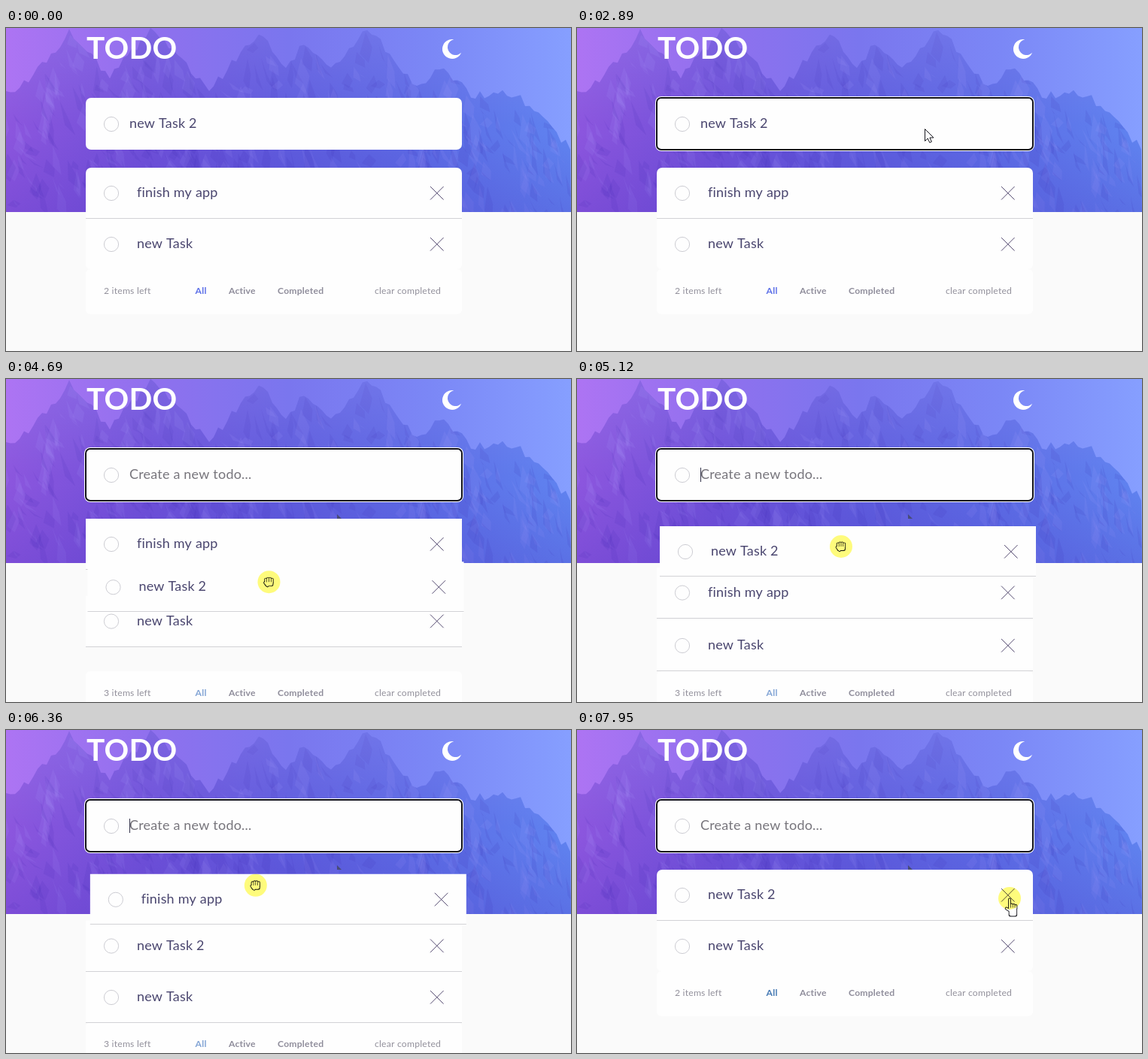
Animation, 751 px wide and 430 px high, one loop 8000 ms. Source, as an HTML page with a canvas:

```html
<!DOCTYPE html>
<html lang="en">
<head>
<meta charset="utf-8">
<title>Todo</title>
<style>
html, body { margin: 0; width: 100%; height: 100%; overflow: hidden; background: #fafafa; }
canvas { display: block; }
</style>
</head>
<body>
<canvas id="stage" width="751" height="430"></canvas>
<script>
const W = 751, H = 430, LOOP = 8000, HERO = 245;
const LEFT = 106, TOP = 186, ROW = 68, CARD = 500;
const FONT = 'Lato, sans-serif', INK = '#4a466f', CARD_BG = '#fefefe';
const A = 'finish my app', B = 'new Task', C = 'new Task 2';

// Moments of the story, in ms
const ENTER = 390, FOCUS = 1300, ADD = 3370, GRAB1 = 4200, DROP1 = 5520;
const GRAB2 = 5970, DROP2 = 6430, REMOVE = 7260, BLINK = 530;

const ctx = document.getElementById('stage').getContext('2d');
const clamp = v => Math.max(0, Math.min(1, v));
const smooth = v => v * v * (3 - 2 * v);
const easeOut = (t, start, span) => 1 - (1 - clamp((t - start) / span)) ** 3;

// ---- Hero backdrop -------------------------------------------------
function seeded(seed) {
  return () => (seed = (seed * 16807) % 2147483647) / 2147483647;
}

function gradient(g, x, y0, y1, colors) {
  const fill = g.createLinearGradient(0, y0, x, y1);
  colors.forEach((c, i) => fill.addColorStop(i / (colors.length - 1), c));
  return fill;
}

function poly(g, pts, fill) {
  g.beginPath();
  pts.forEach(([x, y]) => g.lineTo(x, y));
  g.closePath();
  g.fillStyle = fill;
  g.fill();
}

const peaks = [[85, 5], [195, 0], [335, 8], [400, 18], [480, 0], [580, 48], [660, 82]];

function ridgeAt(x) {
  return Math.min(90 + Math.max(0, x - 680), ...peaks.map(([px, py]) => py + Math.abs(x - px) * 1.15));
}

function makeHero() {
  const hero = document.createElement('canvas');
  hero.width = W;
  hero.height = HERO;
  const g = hero.getContext('2d'), rand = seeded(77);
  const paint = fill => { g.fillStyle = fill; g.fillRect(0, 0, W, HERO); };
  paint(gradient(g, W, 0, 0, ['#ad74f3', '#9070ee', '#7a76ee', '#7b87f6', '#869fff']));

  g.beginPath();
  g.moveTo(0, HERO);
  for (let x = 0; x <= W; x += 6) g.lineTo(x, ridgeAt(x) + (rand() - 0.5) * 12);
  g.lineTo(W, HERO);
  g.clip();
  paint(gradient(g, W, 0, 0, ['#8c56de', '#6e50d8', '#5e5cdd', '#5c6ce5', '#6084f0']));

  // Rock faces lean down to the right, lit or shaded at random
  for (let i = 0; i < 520; i++) {
    const x = rand() * W, y = ridgeAt(x) + rand() * 190, h = 10 + rand() * 38, w = 3 + rand() * 9;
    const lean = (rand() - 0.35) * 22;
    const shade = rand() < 0.5 ? 'rgba(48,34,165,.1)' : 'rgba(175,170,255,.1)';
    poly(g, [[x, y], [x + w, y + h * 0.5], [x + lean + w, y + h], [x + lean - 3, y + h * 0.7]], shade);
  }
  paint(gradient(g, 0, 0, 130, ['rgba(175,165,255,.24)', 'rgba(175,165,255,0)']));
  paint(gradient(g, 0, 140, HERO, ['rgba(72,45,190,0)', 'rgba(72,45,190,.22)']));
  return hero;
}
const hero = makeHero();

// ---- Small drawing helpers -----------------------------------------
function box(x, y, w, h, r, fill) {
  ctx.beginPath();
  ctx.roundRect(x, y, w, h, r);
  ctx.fillStyle = fill;
  ctx.fill();
}

function text(str, x, y, size, fill, weight = 400) {
  ctx.font = `${weight} ${size}px ${FONT}`;
  ctx.letterSpacing = '0.2px';
  ctx.fillStyle = fill;
  ctx.fillText(str, x, y);
}

function line(x0, y0, x1, y1) {
  ctx.beginPath();
  ctx.moveTo(x0, y0);
  ctx.lineTo(x1, y1);
  ctx.stroke();
}

function ring(x, y) {
  ctx.beginPath();
  ctx.arc(x, y, 9.6, 0, 7);
  ctx.strokeStyle = '#cdcdd3';
  ctx.lineWidth = 1;
  ctx.stroke();
}

function cross(x, y) {
  const r = 8.8;
  ctx.strokeStyle = '#544a70';
  ctx.lineWidth = 1;
  line(x - r, y - r, x + r, y + r);
  line(x + r, y - r, x - r, y + r);
}

// ---- Header and input ----------------------------------------------
const moon = new Path2D('M15.4 .2A10.5 10.5 0 1 0 25.1 17.7A13 13 0 1 1 15.4 .2Z');

function drawHeader() {
  text('TODO', 107, 41, 40.5, '#fff', 700);
  ctx.save();
  ctx.translate(580, 15);
  ctx.fillStyle = '#fff';
  ctx.fill(moon);
  ctx.restore();
}

function caretOn(t) {
  const phase = t < ADD ? FOCUS : ADD + BLINK;
  return t >= FOCUS && Math.floor((t - phase) / BLINK) % 2 === 0;
}

function drawInput(t) {
  const added = t >= ADD;
  if (t >= FOCUS) {
    ['#fff', '#101018', CARD_BG].forEach((fill, i) => {
      const inset = [0, 1, 3][i];
      box(104 + inset, 91 + inset, 504 - 2 * inset, 73 - 2 * inset, 8 - inset, fill);
    });
  } else {
    box(LEFT, 93, CARD, 69, 7, CARD_BG);
  }
  ring(140, 128);
  if (added) text('Create a new todo...', 164, 133, 18, '#77757c');
  else text(C, 164, 133, 18, INK);
  if (caretOn(t)) {
    ctx.fillStyle = '#33334a';
    ctx.fillRect(added ? 164 : 251, 118, 1, 19);
  }
}

// ---- Pointer -------------------------------------------------------
const moves = [
  { from: ENTER, to: 960, x: 462, y: 134 },
  { from: ADD, to: 3920, x: 364, y: 333 },
  { from: 3920, to: GRAB1, x: 347, y: 349 },
  { from: GRAB1, to: 5040, x: 351, y: 223 },
  { from: DROP1, to: 5900, x: 326, y: 269 },
  { from: 6010, to: 6400, x: 332, y: 205 },
  { from: DROP2, to: 6920, x: 575, y: 213 },
  { from: 6920, to: 7060, x: 575, y: 222 },
  { from: 7460, to: 7950, x: 575, y: 224 }
];

function pointerAt(t) {
  return moves.reduce(([px, py], { from, to, x, y }) => {
    const k = smooth(clamp((t - from) / (to - from)));
    return [px + (x - px) * k, py + (y - py) * k];
  }, [580, 348]);
}

const dragging1 = t => t >= GRAB1 && t < DROP1;
const dragging2 = t => t >= GRAB2 && t < DROP2;
const pressed = t => dragging1(t) || dragging2(t) ||
  [FOCUS, REMOVE, LOOP].some(end => t >= end - 70 && t < end);

const arrow = new Path2D('M.5 .5V16.5L4.2 13L6.8 18.6L9.4 17.4L6.9 12H12Z');
const hands = {
  open: { reach: [5, 7, 7, 5], thumb: -7, wrist: 7 },
  closed: { reach: [3.6, 4.6, 4.6, 3.6], thumb: -5.4, wrist: 5 },
  point: { reach: [11, 4, 3.5, 2.5], thumb: -8.5, wrist: 11 }
};

// Dark pass first, then a thinner white one, leaves an outline
function drawHand({ reach, thumb, wrist }) {
  ctx.lineCap = 'round';
  for (const [color, edge] of [['#15151c', 0.9], ['#fff', 0]]) {
    ctx.strokeStyle = color;
    ctx.lineWidth = 2.1 + 2 * edge;
    reach.forEach((r, i) => line(2.8 * i - 4.2, 1, 2.8 * i - 4.2, -r));
    line(-2, 5, thumb, 1);
    box(-4.6 - edge, 0 - edge, 9.6 + 2 * edge, wrist + 2 * edge, 2.5, color);
  }
}

function drawPointer(t) {
  if (t < ENTER) return;
  ctx.save();
  ctx.translate(...pointerAt(t));
  if (t < 3690) {
    ctx.fillStyle = '#fff';
    ctx.strokeStyle = '#15151c';
    ctx.lineWidth = 1;
    ctx.fill(arrow);
    ctx.stroke(arrow);
  } else if (t < 6640) {
    drawHand(pressed(t) ? hands.closed : hands.open);
  } else {
    ctx.save();
    ctx.translate(4.2, 12.5);
    drawHand(hands.point);
    ctx.restore();
  }
  if (pressed(t)) {
    ctx.globalCompositeOperation = 'multiply';
    ctx.beginPath();
    ctx.arc(0, 0, 15, 0, 7);
    ctx.fillStyle = '#fffc7c';
    ctx.fill();
  }
  ctx.restore();
}

// ---- Task list -----------------------------------------------------
const slot = i => TOP + ROW * i;
const rows = (...names) => names.map((name, i) => ({ name, x: LEFT, y: slot(i) }));

function lift(row, dx, dy) {
  row.held = Math.abs(dx) + Math.abs(dy) > 0.1;
  row.x += dx;
  row.y += dy;
}

function listAt(t) {
  const [px, py] = pointerAt(t);
  if (t < ADD) return rows(A, B);
  if (t >= REMOVE) return rows(C, B);

  let list;
  if (t < DROP1) {
    list = rows(A, B, C);
    if (dragging1(t)) {
      list[0].y += 67 * easeOut(t, 4900, 330);
      list[1].y += 67 * easeOut(t, 4620, 330);
      lift(list[2], px - 347, py - 349);
    }
  } else if (t < DROP2) {
    list = rows(C, A, B);
    if (dragging2(t)) {
      list[0].y += ROW * easeOut(t, 6150, 260);
      lift(list[1], px - 326, py - 269);
    } else {
      const k = 1 - easeOut(t, DROP1, 260);
      lift(list[0], 4 * k, 10 * k);
    }
  } else {
    list = rows(A, C, B);
    const k = 1 - easeOut(t, DROP2, 200);
    lift(list[0], 6 * k, 4 * k);
  }
  return list;
}

function drawRow({ name, x, y, held }, first, last) {
  const top = first ? 7 : 0, end = last ? 6 : 0;
  box(x, y, CARD, last ? 67 : ROW, [top, top, end, end], CARD_BG);
  if (!last) {
    ctx.fillStyle = '#d2d2d6';
    ctx.fillRect(x, Math.round(y) + (held ? 66 : 67), CARD, 1);
  }
  ring(x + 34, y + 34);
  text(name, x + 68, y + 39, 18, INK);
  cross(x + 466.8, y + 33.8);
}

function allColor(t) {
  if (t < ADD) return '#5d70e8';
  if (t < DROP2) return '#83a5d5';
  return t < REMOVE ? '#4b6fd2' : '#467ab4';
}

function drawList(t) {
  const list = listAt(t), n = list.length, footer = slot(n) - 1;
  box(LEFT, footer, CARD, 60, 6, CARD_BG);
  const small = (str, x, fill, weight) => text(str, x, footer + 33, 12.2, fill, weight);
  small(`${n} items left`, 130, '#92909b');
  small('All', 251.5, allColor(t), 700);
  small('Active', 296, '#8f8d9b', 700);
  small('Completed', 361, '#8f8d9b', 700);
  small('clear completed', 490, '#92909b');

  const moving = list.some(row => row.held);
  const paint = held => list.forEach((row, i) => {
    if (!!row.held === held) drawRow(row, !moving && i === 0, !moving && i === n - 1);
  });
  paint(false);
  paint(true);
}

// ---- Frame loop ----------------------------------------------------
function draw(t) {
  ctx.fillStyle = '#fafafa';
  ctx.fillRect(0, 0, W, H);
  ctx.drawImage(hero, 0, 0);
  drawHeader();
  drawInput(t);
  if (t >= 3650) poly(ctx, [[440, 180], [446, 186], [440, 186]], '#484c78');
  drawList(t);
  drawPointer(t);
}

const start = performance.now();
function tick() {
  draw((performance.now() - start) % LOOP);
  requestAnimationFrame(tick);
}
tick();
</script>
</body>
</html>
```
